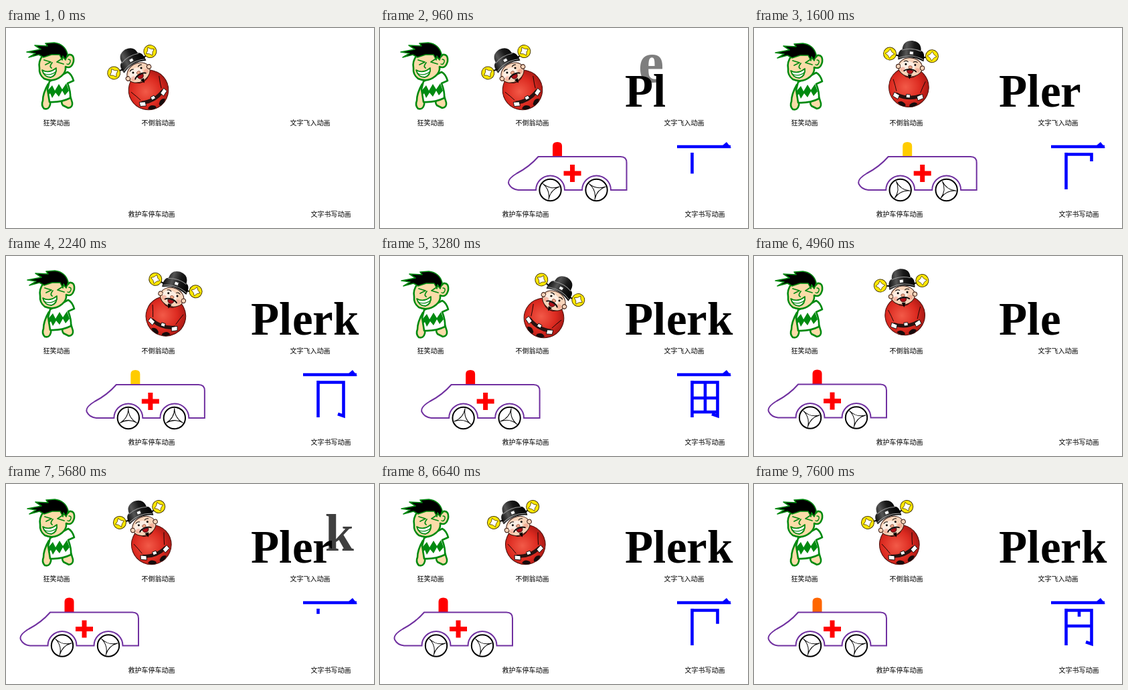
Animation of 550 by 300 pixels, one loop 7680 ms. Source, as an HTML page:

```html
<!DOCTYPE html>
<html lang="zh">
<head>
<meta charset="utf-8">
<style>
html, body { margin: 0; width: 100%; height: 100%; overflow: hidden; background: #fff; }
svg { display: block; width: 550px; height: 300px; }
.label { font: 10px "Noto Sans CJK SC", "Noto Sans CJK", sans-serif; fill: #000; }
.word { font: bold 69px "Liberation Serif", "Times New Roman", serif; }
.ink { fill: none; stroke: #00f; stroke-width: 4.6; stroke-linejoin: miter; }
.line { fill: none; stroke: #000; stroke-linecap: round; stroke-linejoin: round; }
.green { stroke: #008a10; stroke-width: 2.6; stroke-linejoin: round; stroke-linecap: round; }
</style>
</head>
<body>
<svg viewBox="0 0 550 300">
  <defs>
    <radialGradient id="robe" cx=".42" cy=".5" r=".62">
      <stop offset="0" stop-color="#f25a48"/><stop offset=".6" stop-color="#dc2a20"/><stop offset="1" stop-color="#a01612"/>
    </radialGradient>
    <linearGradient id="cap" x1="0" x2="1">
      <stop offset="0" stop-color="#111"/><stop offset=".3" stop-color="#555"/><stop offset=".6" stop-color="#1a1a1a"/><stop offset="1" stop-color="#000"/>
    </linearGradient>
    <g id="coin">
      <circle r="9.5" fill="#ffe800" stroke="#4a3c00"/>
      <path d="M0-7Q2-2 7 0Q2 2 0 7Q-2 2-7 0Q-2-2 0-7Z" fill="#fff" stroke="#5a4800" stroke-width=".8"/>
    </g>
    <g id="wheel">
      <circle r="16.2" fill="#fff" stroke="#000" stroke-width="2"/>
      <path class="spokes line" d="M14.500 0Q0 0-7.250 12.560Q0 0-7.250-12.560Q0 0 14.500 0Z"/>
    </g>
  </defs>

  <g id="boy">
    <path class="green" fill="#fbdca8" d="M63 84Q55 98 55 109Q52 116 57 121Q64 123 66 115L67 104Z"/>
    <path class="green" fill="#fbdca8" d="M86 103Q81 112 85 116L93 120Q100 119 99 112L96 102Z"/>
    <path class="green" fill="#fff" d="M65 80L92 66Q98 69 101 79L92 83Q97 96 96 105Q82 112 65 111L62 92Z"/>
    <path fill="#008a10" d="M63 93L69 86L73 94L79 84L84 92L90 83L94 94L88 101L84 94L79 103L74 97L69 105L66 98L62 102Z"/>
    <path class="green" fill="#fbdca8" d="M55 41Q48 50 50 60Q49 70 57 76Q71 82 83 72Q90 66 89 58Q98 62 101 50Q102 39 94 40L88 46L80 35Z"/>
    <path class="line green" style="stroke-width:1.5" d="M93 47Q97 47 96 51Q94 56 91 54"/>
    <path fill="#000" class="green" style="stroke-width:1.6" d="M34 44L44 38L31 36L52 32L43 26L62 27L59 23L72 22Q88 24 92 39L89 48L85 42L84 48L80 40L68 40L56 44L49 40Z"/>
    <path class="line green" style="stroke-width:1.8" d="M57 48L67 51L59 55M85 45L76 51L86 54M69 52Q64 58 68 60"/>
    <path class="green" style="stroke-width:1.8" fill="#fff" d="M54 63Q64 69 75 60Q76 71 67 74Q57 74 54 63Z"/>
    <path class="line green" style="stroke-width:1.2" d="M56 68Q66 73 75 65"/>
  </g>

  <g id="doll">
    <circle cy="-32" r="29.8" fill="url(#robe)" stroke="#4a0c08"/>
    <path class="line" stroke-width=".8" d="M-24-42Q-20-32-18-25M24-42Q20-32 18-25M-12-52Q0-40 12-52"/>
    <path d="M-18-23Q0-15 18-23L17-17Q0-10-17-17Z" fill="#281210"/>
    <rect x="-3" y="-21" width="6" height="5" fill="#fff" stroke="#000" stroke-width=".8"/>
    <path d="M-15-8Q-9-13-3-6L-3-3Q-10-2-15-8ZM15-8Q9-13 3-6L3-3Q10-2 15-8Z" fill="#160c0c"/>
    <path d="M-21-23L-13-19L-15-13L-23-17ZM21-23L13-19L15-13L23-17Z" fill="#fff" stroke="#000" stroke-width=".8"/>
    <ellipse cy="-62" rx="18" ry="14" fill="#f8d4ba" stroke="#3a1a10"/>
    <circle cx="-18" cy="-62" r="3.2" fill="#f8d4ba" stroke="#3a1a10"/>
    <circle cx="18" cy="-62" r="3.2" fill="#f8d4ba" stroke="#3a1a10"/>
    <ellipse cx="-4" cy="-63" rx="11" ry="8" fill="#fff" opacity=".6"/>
    <circle cx="-11" cy="-58" r="3.5" fill="#ee8d78" opacity=".5"/>
    <circle cx="11" cy="-58" r="3.5" fill="#ee8d78" opacity=".5"/>
    <path class="line" stroke-width="1" d="M-10-70Q-7-72-4-70M10-70Q7-72 4-70"/>
    <circle cx="-7" cy="-66" r="1.5"/><circle cx="7" cy="-66" r="1.5"/>
    <ellipse cy="-62" rx="2.8" ry="2.2" fill="#f2a98a" stroke="#6a3020" stroke-width=".6"/>
    <path class="line" stroke-width="1.8" d="M-9-56Q-6-59 0-59Q6-59 9-56"/>
    <path d="M-5-57Q0-59 5-57Q4-52 0-52Q-4-52-5-57Z" fill="#b01018" stroke="#000" stroke-width=".6"/>
    <path d="M-3-51L0-44L3-51Z"/>
    <path d="M-19-72Q-21-86-14-88Q-14-101 0-102Q14-101 14-88Q21-86 19-72Q0-81-19-72Z" fill="url(#cap)"/>
    <path class="line" style="stroke:#999" stroke-width="1" d="M-14-87Q0-92 14-87M-18-75Q0-83 18-75"/>
    <rect x="-3" y="-86" width="6" height="5" fill="#fff" stroke="#333"/>
    <path class="line" stroke-width="2" d="M-19-78L-25-79M19-78L25-79"/>
    <use href="#coin" x="-32" y="-80"/>
    <use href="#coin" x="31" y="-81"/>
  </g>

  <g id="word" class="word"></g>

  <g id="car">
    <path id="lamp" d="M67.500 193V177Q67.500 171 74.500 171Q81.500 171 81.500 177V193Z"/>
    <path fill="none" stroke="#7030a0" stroke-width="2" d="M46 193H169Q178 193 178 202V243H154.500A21.500 21.500 0 0 0 111.500 243H85.500A21.500 21.500 0 0 0 42.500 243H16Q6 242 2 234Q-1 227 14 218Q33 208 46 193Z"/>
    <path d="M84 214.500H93.500V205H100.500V214.500H110V221.500H100.500V231H93.500V221.500H84Z" fill="#f00"/>
    <use href="#wheel" x="64" y="243"/>
    <use href="#wheel" x="133" y="243"/>
  </g>

  <g id="glyph"></g>
  <g id="labels" class="label"></g>
</svg>
<script>
const STEP = 80, COUNT = 96;
const $ = id => document.getElementById(id);
const add = (parent, tag, attrs, text) => {
  const el = document.createElementNS('http://www.w3.org/2000/svg', tag);
  for (const k in attrs) el.setAttribute(k, attrs[k]);
  if (text) el.textContent = text;
  return parent.appendChild(el);
};
const clamp = v => Math.max(0, Math.min(1, v));
const move = (el, v) => el.setAttribute('transform', v);

[['狂笑动画', 55.5, 146], ['不倒翁动画', 202.5, 146], ['文字飞入动画', 424.5, 146],
 ['救护车停车动画', 182.5, 283], ['文字书写动画', 455.5, 283]]
  .forEach(([text, x, y]) => add($('labels'), 'text', { x, y }, text));

// Letters: character, left edge, centre x, centre y
const letters = [['P', 366, 387, 95], ['l', 408, 418, 95], ['e', 428, 444, 102],
                 ['r', 458, 474, 102], ['k', 489, 508, 95]]
  .map(([ch, x, cx, cy]) => ({ cx, cy, el: add($('word'), 'text', { x, y: 118 }, ch) }));

// Brush strokes: path, first step, last step
const strokes = [
  ['M444 178H524', 0, 8],
  ['M466.500 187V242', 8, 15],
  ['M466 189.500H504.500V240L496 237', 15, 25],
  ['M468 213H503', 28, 31],
  ['M486 190V235', 32, 37],
  ['M468 234H503', 37, 41],
  ['M448.500 196V247', 41, 47],
  ['M446 246.500H514', 47, 56],
  ['M513.500 197V250', 56, 60]
].map(([d, from, to]) => ({
  from, to, el: add($('glyph'), 'path', { d, class: 'ink', pathLength: 1 })
}));
const tip = add($('glyph'), 'path', { d: 'M511 177L518 171L525 180Z', fill: '#00f' });

const spokes = document.querySelector('.spokes');

function drawBoy(f) {
  const [x, y] = [[0, 0], [1, 0], [1, 1]][f % 3];
  move($('boy'), `translate(${x} ${y})`);
}

function drawDoll(f) {
  const k = f % 12;
  const tilt = k <= 5 ? -30 + 12 * k : 30 - 60 * (k - 5) / 7;
  move($('doll'), `translate(229 120.700) rotate(${tilt})`);
}

function drawWord(f) {
  const k = f % 48;
  letters.forEach(({ el, cx, cy }, i) => {
    const p = clamp((k - 5 * i) / 4), q = 1 - p;
    const dx = (18 * i - 112) * q, dy = -82 * q;
    move(el, `translate(${cx + dx} ${cy + dy}) scale(${1 + 0.5 * q}) translate(${-cx} ${-cy})`);
    el.setAttribute('opacity', p);
  });
}

function drawCar(f) {
  const parked = f > 50;
  const x = parked ? 20 : 20.3 + 4.48 * (50 - f);
  $('car').style.display = f ? '' : 'none';
  move($('car'), `translate(${x} ${parked ? -0.5 : 0})`);
  move(spokes, `rotate(${parked ? -15 : -20 - 26.9 * (f - 12)})`);
  const k = (f + 9) % 10;
  $('lamp').setAttribute('fill', k < 4 ? '#f00' : k < 7 ? '#f60' : '#fc0');
}

function drawGlyph(f) {
  const k = f % 62;
  for (const { el, from, to } of strokes) {
    const p = clamp((k - from) / (to - from));
    el.style.display = p ? '' : 'none';
    el.setAttribute('stroke-dasharray', p < 1 ? `${p} 2` : 'none');
  }
  tip.style.display = k >= 8 ? '' : 'none';
}

const start = performance.now();
function draw() {
  const f = Math.floor((performance.now() - start) / STEP) % COUNT;
  for (const part of [drawBoy, drawDoll, drawWord, drawCar, drawGlyph]) part(f);
  requestAnimationFrame(draw);
}
draw();
</script>
</body>
</html>
```
